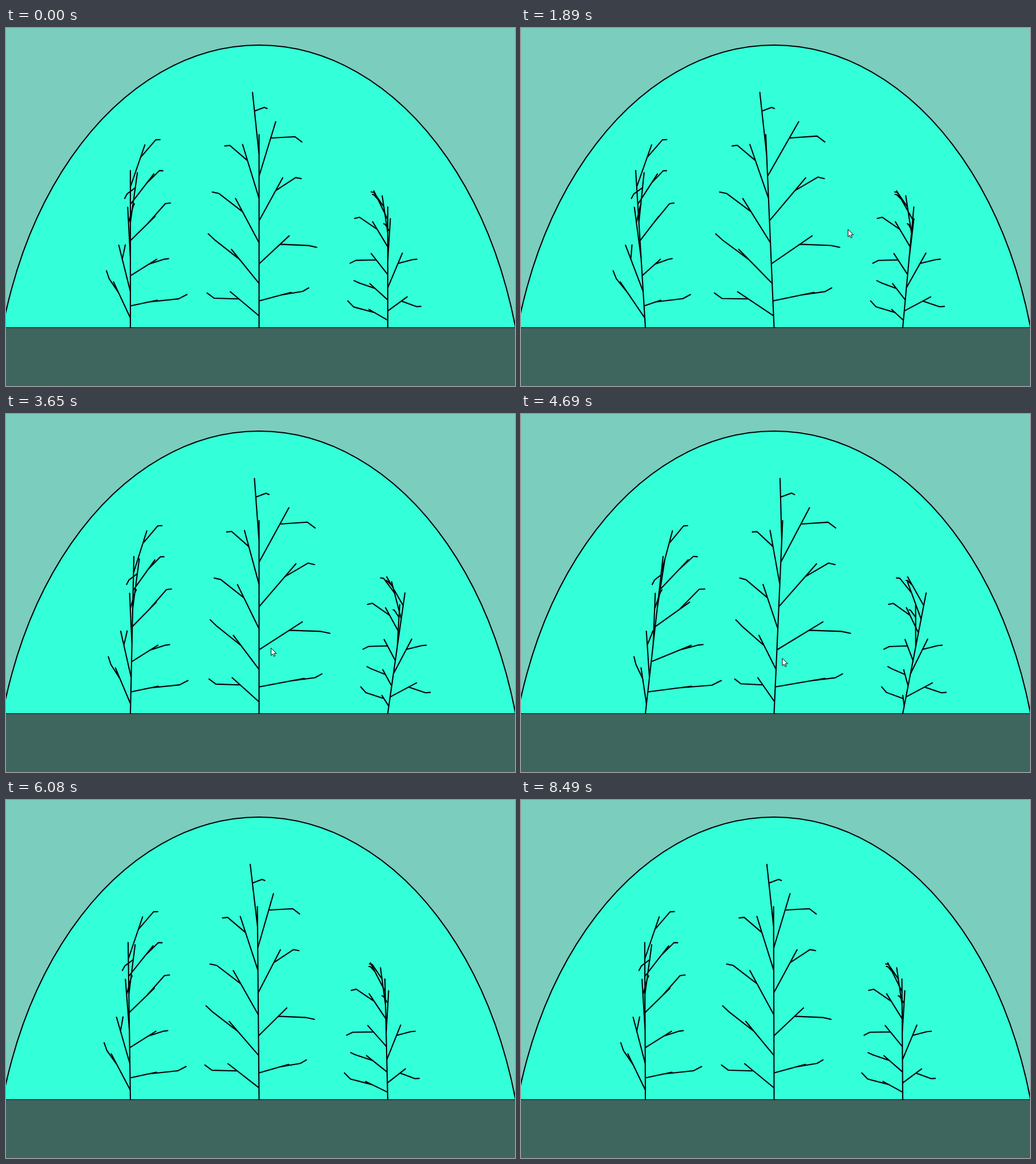
An HTML page with a canvas for the animation above (8.56 s loop, 892 px wide and 628 px high).

```html
<!DOCTYPE html>
<html lang="en">
<head>
<meta charset="utf-8">
<title>Swaying trees</title>
<style>
  html, body { margin: 0; width: 100%; height: 100%; overflow: hidden; background: #7bcdbd; }
  canvas { display: block; }
</style>
</head>
<body>
<canvas id="stage" width="892" height="628"></canvas>
<script>
const ctx = document.getElementById('stage').getContext('2d');
const LOOP = 8560;
const GROUND = 525.5;
const LIMBS = 9;

// left/right: [angle from vertical, length] of the k-th limb on that side.
// ends: where each limb's twig ends, measured from the limb's foot.
// poses: sideways shift of [trunk top, left limbs, right limbs].
const trees = [
  {
    x: 218, height: 275.5,
    left: k => [11 * k - 25, 70 + 18 * k - 4 * k * k],
    right: k => [24 + 54 * .63 ** k, 48 + 6.5 * k],
    ends: [[-42, 83], [99, 20], [-9, 82], [67, 30], [7, 96], [70, 66], [-10, 42], [57, 59], [52, 83]],
    poses: [[-17, -15, -13], [-17, -14, -28], [31, 22, 34], [-4, -4, -1.5]]
  },
  {
    x: 443.5, height: 338.5,
    left: k => [11 * k - 50, 66 + 11 * k],
    right: k => [80 * .65 ** k - 5, 58 + 14 * k],
    ends: [[-91, 40], [87, 23], [-89, 87], [101, 29], [-82, 89], [74, 74], [-60, 92], [75, 60], [14, 81]],
    poses: [[-15, -13, 14], [-14, -14, 14], [15, 22, 33], [-3, -4, -4]]
  },
  {
    x: 669, height: 211.5,
    left: k => [-10 - 50 * .75 ** k, 38 + 4.5 * k],
    right: k => [82 * .62 ** k - 28, 42 + 32 * k - 8 * k * k],
    ends: [[-70, 34], [58, 8], [-59, 34], [51, 50], [-66, 20], [-7, 65], [-58, 50], [-29, 72], [-27, 44]],
    poses: [[19, 14, 15], [20, 13, 15], [41, 33, 18], [-5, -6, -3]]
  }
];

// [time, pose, strength]
const motion = [
  [0, 3, 0], [480, 0, 0], [1190, 0, 1], [2660, 1, 1], [4690, 2, 1],
  [5480, 3, 6], [6080, 3, 1], [7110, 3, -.3], [LOOP, 3, .3]
];
// [time, x, y]
const pointerPath = [
  [490, 826, 592], [1190, 479, 326], [2660, 682, 386], [3200, 773, 405],
  [4150, 103, 418], [4690, 458, 429], [5500, 864, 440]
];

const mix = (a, b, u) => a + (b - a) * u;
const ease = u => (1 - Math.cos(Math.PI * u)) / 2;

function span(keys, t) {
  let i = 0;
  while (i < keys.length - 2 && t >= keys[i + 1][0]) i++;
  const a = keys[i], b = keys[i + 1];
  return { a, b, u: ease((t - a[0]) / (b[0] - a[0])) };
}

function swayAt(tree, t) {
  const { a, b, u } = span(motion, t);
  return [0, 1, 2].map(part =>
    mix(tree.poses[a[1]][part] * a[2], tree.poses[b[1]][part] * b[2], u));
}

function polyline(...points) {
  points.forEach(([x, y], i) => i ? ctx.lineTo(x, y) : ctx.moveTo(x, y));
}

// Limbs stand closer together near the ground.
function limbLevel(i) {
  const s = (i + 1) / (LIMBS + 1);
  return s - .485 * s * (1 - s) ** 2;
}

function drawTree(tree, t) {
  const [lean, leftShift, rightShift] = swayAt(tree, t);
  polyline([tree.x, GROUND], [tree.x + lean, GROUND - tree.height]);

  for (let i = 0; i < LIMBS; i++) {
    const onLeft = i % 2 === 0;
    const level = limbLevel(i);
    const foot = [tree.x + lean * level, GROUND - tree.height * level];
    const [degrees, length] = (onLeft ? tree.left : tree.right)(i >> 1);
    const angle = degrees * Math.PI / 180;
    const rest = tree.x + (onLeft ? leftShift : rightShift);
    const tip = [rest + Math.sin(angle) * length, foot[1] - Math.cos(angle) * length];
    const end = [rest + tree.ends[i][0], foot[1] - tree.ends[i][1]];
    polyline(foot, tip);
    drawTwig(foot, tip, end, Math.max(.12 - .05 * i, -.14));
  }
}

// Low twigs sag before their end, high ones arch over.
function drawTwig(foot, tip, end, sag) {
  const joint = [mix(foot[0], tip[0], .7), mix(foot[1], tip[1], .7)];
  const reach = Math.hypot(end[0] - joint[0], end[1] - joint[1]);
  const bend = [mix(joint[0], end[0], .78), mix(joint[1], end[1], .78) + sag * reach];
  polyline(joint, bend, end);
}

const arrow = new Path2D('M0 0V12.5L3 9.8L5 14.2L7 13.3L5.1 9H9Z');

function drawPointer(t) {
  if (t < 490 || t > 5500) return;
  const { a, b, u } = span(pointerPath, t);
  ctx.save();
  ctx.translate(mix(a[1], b[1], u), mix(a[2], b[2], u));
  ctx.lineWidth = 1;
  ctx.fillStyle = '#fff';
  ctx.fill(arrow);
  ctx.stroke(arrow);
  ctx.restore();
}

function drawScene() {
  ctx.fillStyle = '#7bcdbd';
  ctx.fillRect(0, 0, 892, 628);
  ctx.strokeStyle = '#000';
  ctx.lineWidth = 2;
  ctx.beginPath();
  ctx.ellipse(443.5, 704, 466, 674, 0, 0, 2 * Math.PI);
  ctx.fillStyle = '#33ffd8';
  ctx.fill();
  ctx.stroke();
  ctx.fillStyle = '#3e665e';
  ctx.fillRect(0, 525, 892, 103);
  ctx.fillStyle = '#000';
  ctx.fillRect(0, 525, 892, 1);
}

const start = performance.now();
function frame() {
  const t = (performance.now() - start) % LOOP;
  drawScene();
  ctx.lineCap = ctx.lineJoin = 'round';
  ctx.lineWidth = 2.1;
  ctx.beginPath();
  trees.forEach(tree => drawTree(tree, t));
  ctx.stroke();
  drawPointer(t);
  requestAnimationFrame(frame);
}
frame();
</script>
</body>
</html>
```
